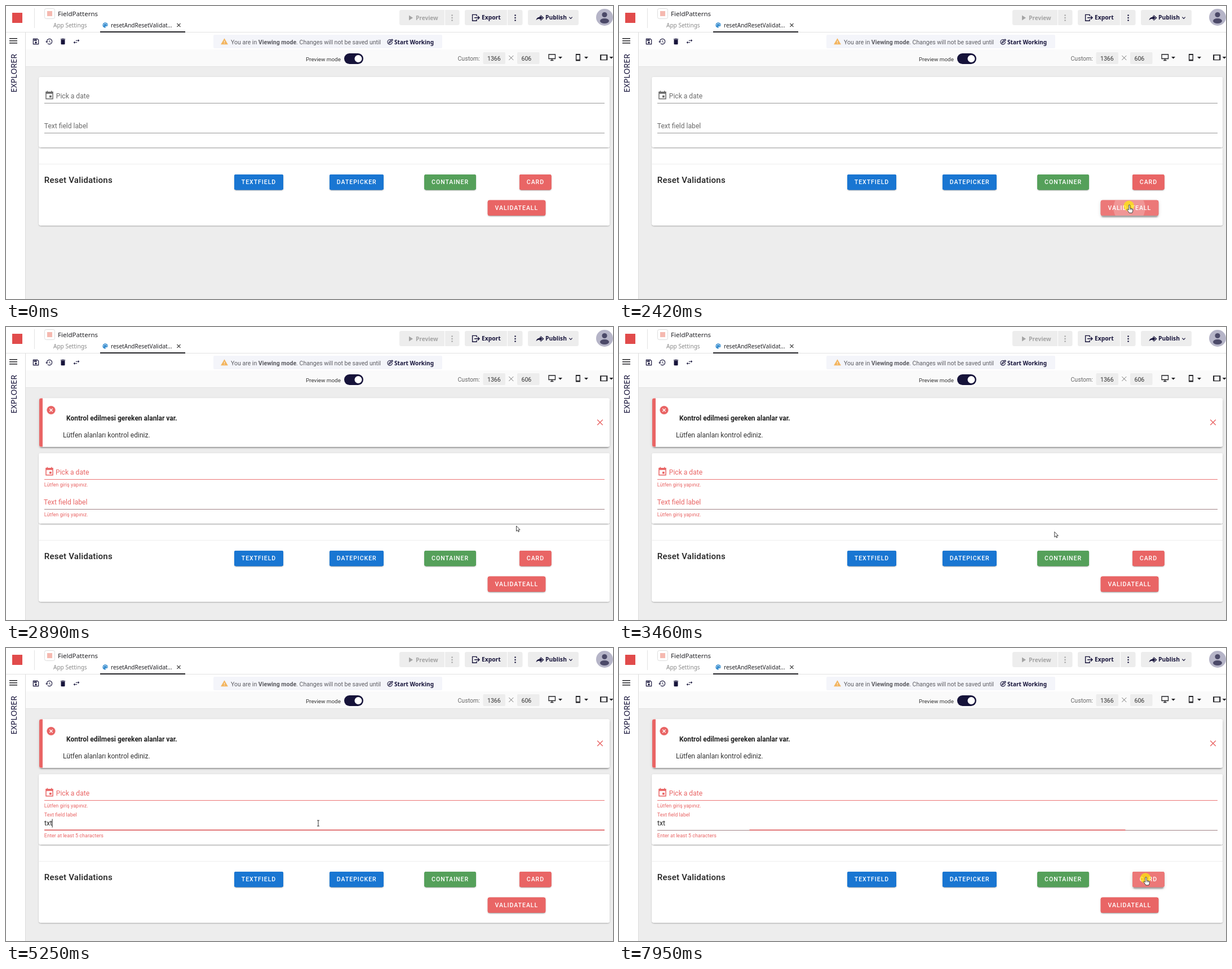
Animation of 1077x520 px, one loop 8000 ms. Source, as an HTML page with a canvas:

```html
<!DOCTYPE html>
<html lang="en">
<head>
<meta charset="utf-8">
<title>Form validation demo</title>
<style>
  html, body { margin: 0; width: 100%; height: 100%; overflow: hidden; background: #ededed; }
  canvas { display: block; }
</style>
</head>
<body>
<canvas id="stage" width="1077" height="520"></canvas>
<script>
const ctx = document.getElementById('stage').getContext('2d');
const LOOP = 8000;
const ROBOTO = 'Roboto, sans-serif';
const NOTO = '"Noto Sans", "Open Sans", sans-serif';
const RED = '#e96565', BLUE = '#1976d2', GREEN = '#55a05a';
const NAVY = '#16133a', INK = '#222226', GREY = '#6c6c6c';

// Key moments in ms
const ENTER = 1260, PRESS = 2360, SHOW_ERRORS = 2490, FOCUS = 4030, KEYS = [4990, 5120, 5250];
const CARD_HOVER = 7330, BLUR = 7916;

const ICONS = {
  save: 'M17 3H3V21H21V7ZM19 19H5V5H16.2L19 7.8ZM12 12A3 3 0 1 0 12 18 3 3 0 1 0 12 12ZM6 6H15V10H6Z',
  history: 'M13 3a9 9 0 0 0-9 9H1l3.9 3.9L9 12H6a7 7 0 1 1 2.06 4.94l-1.42 1.42A9 9 0 1 0 13 3zm-1 5v5l4.28 2.54.72-1.21-3.5-2.08V8z',
  trash: 'M6 19a2 2 0 0 0 2 2h8a2 2 0 0 0 2-2V7H6zM19 4h-3.5l-1-1h-5l-1 1H5v2h14z',
  swap: 'M7 11L3 15l4 4v-3h7v-2H7zM21 9l-4-4v3h-7v2h7v3z',
  warning: 'M1 21h22L12 2zm12-3h-2v-2h2zm0-4h-2v-4h2z',
  calendar: 'M17 12h-5v5h5zM16 1v2H8V1H6v2H3v18h18V3h-3V1zm3 18H5V8h14z',
  palette: 'M12 3a9 9 0 0 0 0 18c2 0 2-2 1-3s0-2 1-2h2a5 5 0 0 0 5-5c0-4.4-4-8-9-8z',
  share: 'M14 5l9 7-9 7v-4c-5 0-9 1-12 5 1-6 4-10 12-11z'
};
const HAND = 'M-1.2 9V1.1A1.2 1.2 0 0 1 1.2 1.1V6L2.6 6.2 4.8 6.8 6.2 7.6V11L5 14.2H-.2L-2 11.5-4 8.8Q-4.3 7.2-2.8 7.6Z';
const ARROW = 'M0 0V9.4L2.1 7.4 3.5 10.6 5 10 3.6 6.9H6.6Z';

const clamp = v => Math.max(0, Math.min(1, v));
const ramp = (t, start, length) => clamp((t - start) / length);
const mix = (a, b, k) => a + (b - a) * k;
const smooth = k => k * k * (3 - 2 * k);

function bezier(x1, y1, x2, y2) {
  const at = (a, b, s) => 3 * (1 - s) * (1 - s) * s * a + 3 * (1 - s) * s * s * b + s * s * s;
  return x => {
    let lo = 0, hi = 1;
    for (let i = 0; i < 24; i++) {
      const mid = (lo + hi) / 2;
      if (at(x1, x2, mid) < x) lo = mid; else hi = mid;
    }
    return at(y1, y2, lo);
  };
}
const swift = bezier(.25, .8, .5, 1);
const rippleEase = bezier(.25, .8, .25, 1);

function text(str, x, y, size, color, weight = 400, font = ROBOTO, spacing = 0) {
  ctx.font = `${weight} ${size}px ${font}`;
  ctx.letterSpacing = spacing + 'px';
  ctx.fillStyle = color;
  ctx.fillText(str, x, y);
}
function rect(x, y, w, h, color) {
  ctx.fillStyle = color;
  ctx.fillRect(x, y, w, h);
}
function round(x, y, w, h, r, color) {
  ctx.beginPath();
  ctx.roundRect(x, y, w, h, r);
  ctx.fillStyle = color;
  ctx.fill();
}
function disc(x, y, r, color) {
  ctx.beginPath();
  ctx.arc(x, y, r, 0, 7);
  ctx.fillStyle = color;
  ctx.fill();
}
function stroke(d, color, width) {
  ctx.strokeStyle = color;
  ctx.lineWidth = width;
  ctx.stroke(new Path2D(d));
}
function fill(d, color) {
  ctx.fillStyle = color;
  ctx.fill(new Path2D(d));
}
function icon(name, cx, cy, size, color) {
  ctx.save();
  ctx.translate(cx - size / 2, cy - size / 2);
  ctx.scale(size / 24, size / 24);
  ctx.fillStyle = color;
  ctx.fill(new Path2D(ICONS[name]), 'evenodd');
  ctx.restore();
}
function raised(x, y, w, h, r, color, lift = 1) {
  const layers = [[2.3, .8, -1.5, .2], [1.5, 1.5, 0, .14], [.8, 3.8, 0, .12]];
  for (const [dy, blur, spread, alpha] of layers) {
    ctx.save();
    ctx.shadowColor = `rgba(0,0,0,${alpha})`;
    ctx.shadowOffsetY = dy * lift;
    ctx.shadowBlur = blur * lift;
    round(x - spread, y - spread, w + 2 * spread, h + 2 * spread, r, color);
    ctx.restore();
  }
  round(x, y, w, h, r, color);
}
const cross = (x, y, r, color, width) =>
  stroke(`M${x - r} ${y - r}l${2 * r} ${2 * r}M${x + r} ${y - r}l${-2 * r} ${2 * r}`, color, width);
const caretDown = x => fill(`M${x - 3.5} 90h7l-3.5 3.8z`, INK);
function dots(x, color) {
  for (const y of [16.5, 21, 25.5]) disc(x, y, 1.25, color);
}

function drawHeader() {
  rect(0, 0, 1077, 108, '#fff');
  rect(11, 12, 18, 18, '#e14b4b');
  rect(50, 4, 1, 35, '#e2e2e2');
  ctx.beginPath();
  ctx.roundRect(68.5, 4.5, 18, 18, 3);
  ctx.strokeStyle = '#dcdcdc';
  ctx.lineWidth = 1;
  ctx.stroke();
  rect(73, 9, 9, 9, '#f5b9b0');
  text('FieldPatterns', 92, 18, 11.5, INK, 500, NOTO);
  text('App Settings', 84, 38, 10.05, '#8a8a8a', 400, NOTO);
  icon('palette', 176, 34, 12.5, '#3a8fd0');
  for (const [x, y] of [[173, 33.5], [174.8, 31.3], [177.2, 31.3], [179, 33.5]]) disc(x, y, .8, '#fff');
  text('resetAndResetValidat...', 186, 38, 10.05, INK, 400, NOTO);
  cross(306.5, 34, 3, '#444', 1.1);
  rect(0, 46, 1077, 1, '#e2e2e2');
  rect(167, 45, 151, 2, INK);

  round(698, 7, 80, 27, [3, 0, 0, 3], '#ededed');
  round(779, 7, 25.5, 27, [0, 3, 3, 0], '#ededed');
  fill('M715 16.5v9l7-4.5z', '#a4a4a4');
  text('Preview', 727, 24.5, 10.1, '#a4a4a4', 600, NOTO);
  dots(791.5, '#a4a4a4');
  round(814, 7, 75, 27, [3, 0, 0, 3], '#ededed');
  round(890, 7, 26.5, 27, [0, 3, 3, 0], '#ededed');
  stroke('M835 18v-2.6h-7.4v10.8h7.4v-2.6M831 20.8h8.5M837 17.8l3 3-3 3', NAVY, 1.4);
  text('Export', 844, 24.3, 10.3, NAVY, 600, NOTO);
  dots(903.5, NAVY);
  round(926, 7, 90, 27, 3, '#ededed');
  icon('share', 946, 21, 13, NAVY);
  stroke('M948.5 16.5l5.2 4.5-5.2 4.5', NAVY, 1.2);
  text('Publish', 957, 24.3, 10.3, NAVY, 600, NOTO);
  stroke('M999.3 19.7l2.7 2.7 2.7-2.7', NAVY, 1.2);

  disc(1062, 20, 15, '#b6b5c8');
  disc(1062, 15.5, 4.6, '#4b4968');
  ctx.beginPath();
  ctx.ellipse(1062, 26.5, 8, 4.6, 0, 0, 7);
  ctx.fill();
}

function drawToolbars() {
  icon('save', 53, 63, 14, NAVY);
  icon('history', 76.5, 63, 14, NAVY);
  icon('trash', 101, 63, 14, NAVY);
  icon('swap', 125, 63, 14, NAVY);

  round(368, 51, 406, 24, 2, '#f4f5fa');
  icon('warning', 387.5, 63, 14, '#f3b55f');
  const tint = '#5c5c62';
  let x = 399;
  for (const [part, weight] of [['You are in ', 400], ['Viewing mode', 700], ['. Changes will not be saved until', 400]]) {
    text(part, x, 67.6, 10.55, tint, weight);
    x += ctx.measureText(part).width;
  }
  stroke('M683.5 60.2a4.3 4.3 0 1 0 2 3.2M679.5 65.5l.5-2 5-4.6 1.3 1.3-4.8 4.8z', NAVY, 1.1);
  text('Start Working', 689, 67.6, 10.05, NAVY, 700, NOTO);

  rect(34, 77, 1043, 30, '#fafafa');
  rect(34, 107, 1043, 1, '#e3e3e3');
  text('Preview mode', 532, 97.8, 9.85, '#333', 400);
  round(600, 84, 34, 19, 9.5, NAVY);
  disc(625, 93.5, 6.5, '#fff');
  text('Custom:', 801.5, 96.6, 10.57, '#666');
  round(846.5, 82, 39.5, 21, 2, '#ededed');
  round(907, 82, 39.5, 21, 2, '#ededed');
  text('1366', 854, 96.6, 10.57, '#333');
  text('606', 914.5, 96.6, 10.57, '#333');
  cross(896.3, 92, 4, '#777', 1);
  stroke('M963 86h11.5v7.5h-11.5zM966 96.5h5.5M968.7 93.5v3', INK, 1.3);
  stroke('M1011.6 85.6h6.6v11.2h-6.6zM1011.6 86.4h6.6M1011.6 95.6h6.6', INK, 1.4);
  stroke('M1054.7 87h12v8.6h-12zM1055.6 87v8.6M1065.8 87v8.6', INK, 1.3);
  [983.5, 1029.5, 1074].forEach(caretDown);
}

function drawSidebar() {
  rect(0, 47, 34, 473, '#fff');
  rect(34, 47, 1, 473, '#dcdcdc');
  for (const y of [57, 61, 65]) rect(6, y, 14, 1.5, INK);
  ctx.save();
  ctx.translate(19, 153.5);
  ctx.rotate(-Math.PI / 2);
  text('EXPLORER', 0, 0, 14.2, NAVY, 500, NOTO);
  ctx.restore();
}

function drawAlert() {
  raised(59, 126.5, 1012, 86, 3, '#fff', 1.5);
  round(59, 126.5, 6, 86, [3, 0, 0, 3], RED);
  disc(80, 147.5, 7.6, RED);
  cross(80, 147.5, 2.7, '#fff', 1.3);
  text('Kontrol edilmesi gereken alanlar var.', 107, 166.2, 12, '#222', 700);
  text('Lütfen alanları kontrol ediniz.', 101, 195.5, 12.08, '#333');
  cross(1054, 169.3, 4.8, RED, 1.4);
}

function shake(t) {
  const k = (t - SHOW_ERRORS) / 600;
  if (k < .59 || k > 1) return 0;
  const stops = [[.59, 0], [.6, 1.5], [.7, -1.5], [.8, 1.5], [.9, -1.5], [1, 0]];
  const i = stops.findIndex(s => k <= s[0]);
  if (i < 1) return 0;
  const [k0, v0] = stops[i - 1], [k1, v1] = stops[i];
  return mix(v0, v1, smooth((k - k0) / (k1 - k0)));
}

function drawFields(t, dy) {
  const bad = t >= SHOW_ERRORS;
  const wobble = shake(t);
  const color = bad ? RED : GREY;
  icon('calendar', 77, 158.8 + dy, 18.1, color);
  text('Pick a date', 88.8 + wobble, 164 + dy, 12.08, color);
  rect(68, 172, 994, 1, bad ? '#ec8080' : '#979797');
  return color;
}

function drawForm(t, dy) {
  const bad = t >= SHOW_ERRORS;
  const color = bad ? RED : GREY;
  const wobble = shake(t);
  raised(58.5, 126 + dy, 1012.5, 125, 3, '#fff');

  icon('calendar', 77, 158.8 + dy, 18.1, color);
  text('Pick a date', 88.8 + wobble, 164 + dy, 12.08, color);
  rect(68, 172 + dy, 994, 1, bad ? '#ec7474' : '#979797');

  const float = swift(ramp(t, FOCUS, 300));
  text('Text field label', 67.8 + wobble, mix(216.7, 200.7, float) + dy, mix(12.08, 9.06, float), color);
  rect(68, 225 + dy, 994, 1, bad ? '#a08284' : '#979797');
  const span = 994 * (float - swift(ramp(t, BLUR, 300)));
  if (span > 0) rect(565 - span / 2, 224.3 + dy, span, 1.6, '#e25f60');

  if (bad) {
    ctx.globalAlpha = ramp(t, SHOW_ERRORS - 60, 260);
    const hint = 'Lütfen giriş yapınız.';
    text(hint, 67.8, 185.3 + dy, 9.06, RED);
    text(t < KEYS[0] ? hint : 'Enter at least 5 characters', 67.8, 238.4 + dy, 9.06, RED);
    ctx.globalAlpha = 1;
  }

  const typed = 'txt'.slice(0, KEYS.filter(k => t >= k).length);
  text(typed, 68, 216.8 + dy, 12.08, '#222');
  const width = ctx.measureText(typed).width;
  const wake = [4050, ...KEYS].filter(k => t >= k).pop();
  if (wake && t < BLUR && Math.floor((t - wake) / 530) % 2 === 0) {
    rect(67.7 + width, 205.5 + dy, 1, 15, '#222');
  }
}

function button(label, x, y, w, color, hover = 0) {
  raised(x, y, w, 27.3, 3, color, 1 + hover);
  if (hover) round(x, y, w, 27.3, 3, `rgba(255,255,255,${.12 * hover})`);
  return () => text(label, x + 12.8, y + 17.3, 10.57, '#fff', 500, ROBOTO, .94);
}

function drawActions(t, dy) {
  raised(58.5, 251 + dy, 1012.5, 138.5, 3, '#fff');
  rect(58.5, 280 + dy, 1012.5, 1, '#ededed');
  text('Reset Validations', 67.8, 313.7 + dy, 15.1, '#222', 500, ROBOTO, .19);
  const row = 299 + dy, low = 344.7 + dy;
  button('TEXTFIELD', 405, row, 87, BLUE)();
  button('DATEPICKER', 574, row, 96, BLUE)();
  button('CONTAINER', 742.3, row, 91.5, GREEN)();
  button('CARD', 911, row, 56.5, RED, ramp(t, CARD_HOVER, 200))();
  const hover = ramp(t, 1740, 200) - ramp(t, SHOW_ERRORS, 200);
  const label = button('VALIDATEALL', 854.8, low, 102.4, RED, hover);
  if (t >= PRESS + 30 && t < SHOW_ERRORS + 300) {
    ctx.save();
    ctx.beginPath();
    ctx.roundRect(854.8, low, 102.4, 27.3, 3);
    ctx.clip();
    const r = 53 * (.3 + .7 * rippleEase(ramp(t, PRESS + 30, 300)));
    disc(905.5, low + 13.6, r, `rgba(255,255,255,${.22 * (1 - ramp(t, SHOW_ERRORS, 300))})`);
    ctx.restore();
  }
  label();
}

function pointer(t) {
  if (t < 2360) {
    const k = 1 - (1 - ramp(t, ENTER, 790)) ** 2;
    return [mix(989, 906, k), mix(497, 353, k)];
  }
  if (t < 4200) {
    const k = smooth(ramp(t, 3140, 720)), n = 1 - k;
    return [905.5 * n * n + 2 * 760 * n * k + 553 * k * k, 353 * n * n + 2 * 390 * n * k + 310 * k * k];
  }
  if (t < 7300) {
    const k = smooth(ramp(t, 6480, 800));
    const nudge = ramp(t, 4200, 100);
    return [mix(553 + nudge, 914, k), mix(310 + nudge, 403.7, k)];
  }
  const k = smooth(ramp(t, 7300, 270));
  return [mix(914, 935, k), mix(403.7, 406.7, k)];
}

function drawPointer(t, dy) {
  if (t < ENTER) return;
  const [x, y] = pointer(t);
  const pressed = (t >= PRESS && t < SHOW_ERRORS) || (t >= 4045 && t < 4250) || t >= 7940;
  if (pressed) disc(x - .8, y + (t > 4000 && t < 5000 ? 0 : 1.8), 9.3, 'rgba(255,240,0,.68)');
  const inside = (l, top, r, bottom) => x >= l && x <= r && y >= top && y <= bottom;
  const onButton = inside(855, 344 + dy, 957, 372 + dy) || inside(911, 299 + dy, 967, 326 + dy);
  const onField = inside(68, 190 + dy, 1062, 226 + dy);
  ctx.save();
  ctx.translate(x, y);
  if (onField) {
    stroke('M-2 -5H2M-2 5H2M0 -5V5', '#333', 1);
  } else {
    const shape = onButton ? HAND : ARROW;
    fill(shape, '#fff');
    stroke(shape, '#222', .85);
    if (onButton) stroke('M1.3 6v3M3 6.6v2.6M4.7 7v2.2', '#222', .6);
  }
  ctx.restore();
}

function draw(t) {
  const dy = t >= SHOW_ERRORS ? 98 : 0;
  rect(0, 0, 1077, 520, '#ededed');
  drawHeader();
  drawToolbars();
  drawSidebar();
  if (dy) drawAlert();
  drawActions(t, dy);
  drawForm(t, dy);
  drawPointer(t, dy);
}

const begin = performance.now();
function tick() {
  draw((performance.now() - begin) % LOOP);
  requestAnimationFrame(tick);
}
tick();
</script>
</body>
</html>
```
